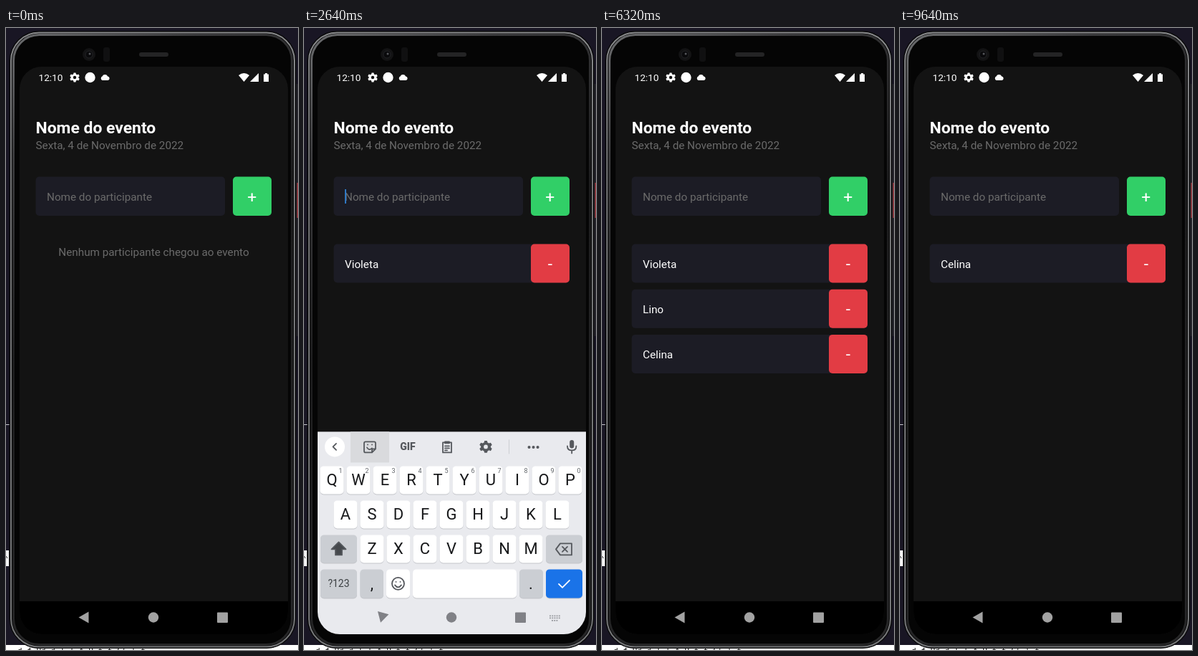
An HTML page that plays this animation: 408 by 868 pixels, repeating every 9.68 s.

```html
<!DOCTYPE html>
<html lang="pt-BR">
<head>
<meta charset="utf-8">
<title>Lista de participantes</title>
<style>
html, body { margin: 0; width: 100%; height: 100%; overflow: hidden; background: #191624; }
svg { display: block; font-family: Roboto, sans-serif; }
.body { font-size: 15.25px; }
.mid { text-anchor: middle; }
.muted { fill: #6b6b6b; }
.field { fill: #1c1c25; }
.line { fill: none; stroke: #55585d; stroke-width: 1.8; stroke-linecap: round; stroke-linejoin: round; }
.key { font-size: 22px; fill: #17181a; }
.hint { font-size: 9px; fill: #5f6368; }
.sign { font-size: 22.9px; fill: #fff; }
</style>
</head>
<body>
<svg width="408" height="868" viewBox="0 0 408 868">
  <defs>
    <clipPath id="screenClip"><rect x="19" y="54" width="375" height="792" rx="31"/></clipPath>
    <linearGradient id="rim" x2="0" y2="1">
      <stop offset="0" stop-color="#8a8b8d"/>
      <stop offset=".2" stop-color="#737476"/>
      <stop offset="1" stop-color="#77787a"/>
    </linearGradient>
    <linearGradient id="bevel" x2=".3" y2="1">
      <stop offset="0" stop-color="#6b6c6e"/>
      <stop offset=".18" stop-color="#3a3a3c"/>
      <stop offset=".5" stop-color="#1b1b1c"/>
      <stop offset="1" stop-color="#262627"/>
    </linearGradient>
    <path id="gear" d="M-1.4-6.5h2.8l.5 1.9 1.5.8 1.9-.6 1.4 2.4-1.4 1.4v1.2l1.4 1.4-1.4 2.4-1.9-.6-1.5.8-.5 1.9h-2.8l-.5-1.9-1.5-.8-1.9.6-1.4-2.4 1.4-1.4v-1.2l-1.4-1.4 1.4-2.4 1.9.6 1.5-.8zM0-2.2a2.2 2.2 0 1 0 0 4.4 2.2 2.2 0 1 0 0-4.4z" fill-rule="evenodd"/>
  </defs>

  <!-- Desktop behind the phone -->
  <rect width="408" height="868" fill="#191624"/>
  <rect x="405" y="78" width="3" height="352" fill="#25242b"/>
  <rect x="406.500" y="216" width="1.500" height="49" fill="#a03c42"/>
  <path d="M0 553.500h5" stroke="#c9c9cf"/>
  <rect y="729" width="4" height="22" fill="#f4f4f4"/>
  <path d="M0 737l2 3" stroke="#333"/>
  <rect y="861" width="408" height="7" fill="#fff"/>

  <!-- Phone shell -->
  <rect x="5" y="4.500" width="400" height="861" rx="41" fill="#050505" stroke="#0b0b0c"/>
  <rect x="7" y="6.500" width="396" height="857" rx="39" fill="#050505" stroke="url(#rim)" stroke-width="2"/>
  <rect x="10.500" y="9.500" width="389" height="851" rx="36" fill="#050505" stroke="url(#bevel)" stroke-width="3"/>
  <rect x="13" y="12" width="384" height="846" rx="34" fill="#050505"/>
  <circle cx="116" cy="37" r="9" fill="#131314"/>
  <circle cx="116" cy="37" r="5" fill="#09090b" stroke="#222326"/>
  <circle cx="117" cy="36" r="1.5" fill="#55575b"/>
  <rect x="136" y="27" width="9" height="20" rx="3" fill="#101011"/>
  <rect x="186" y="34" width="41" height="6" rx="3" fill="#242425"/>
  <text x="16" y="873" font-family="DejaVu Sans Mono, monospace" font-size="11" fill="#111">d f Ud  d  T  T   A    U t  t   Cl  l t</text>

  <g clip-path="url(#screenClip)">
    <rect x="19" y="54" width="375" height="792" fill="#131313"/>

    <g fill="#fff">
      <text x="45.500" y="74" font-size="13.6">12:10</text>
      <use href="#gear" x="96" y="69"/>
      <circle cx="117.500" cy="69" r="7.2"/>
      <path d="M134.500 73a3 3 0 0 1 0-5.500a4.200 4.200 0 0 1 7.600 0a2.800 2.800 0 0 1 .4 5.500z"/>
      <path d="M325 66q7.500-6 15 0l-7.500 9z"/>
      <path d="M353 63v12h-12z"/>
      <path d="M360 64.500h2v-1.500h3v1.500h2v10.500h-7z"/>
    </g>

    <text x="41.500" y="147" font-size="22.9" font-weight="700" fill="#fff">Nome do evento</text>
    <text x="41.500" y="169" class="body muted">Sexta, 4 de Novembro de 2022</text>

    <rect x="41.500" y="207.500" width="264.500" height="54.500" rx="5" class="field"/>
    <text id="placeholder" x="57" y="241" class="body muted">Nome do participante</text>
    <text id="typed" x="57" y="241" class="body" fill="#fff"></text>
    <path id="underline" stroke="#ddd"/>
    <rect id="caret" y="225" width="2" height="20" fill="#2f78c4"/>
    <g id="plus">
      <rect x="317" y="207.500" width="54" height="54.500" rx="5" fill="#31cf67"/>
      <text x="343.800" y="244" class="sign mid">+</text>
    </g>
    <text id="empty" x="206.500" y="318" class="body mid muted">Nenhum participante chegou ao evento</text>
    <g id="rows"></g>

    <rect x="19" y="800" width="375" height="46" fill="#000"/>

    <g id="keyboard">
      <rect x="19" y="562" width="375" height="290" fill="#e9eaee"/>
      <rect id="highlight" x="65" y="562" width="54" height="43" fill="#d9dadd"/>
      <circle cx="43" cy="583" r="14" fill="#fff"/>
      <path id="chevron" class="line"/>
      <g id="suggestions" class="mid" font-size="16" fill="#55585d">
        <text id="suggestion" x="102" y="589"></text>
        <text x="205" y="589">C</text>
        <text x="307" y="589">B</text>
        <path d="M151 572v23M259.500 572v23" stroke="#cccfd3"/>
      </g>
      <g id="tools">
        <path class="line" d="M86 576h12q2 0 2 2v8l-5 5h-9q-2 0-2-2v-11q0-2 2-2zM100 586h-3q-2 0-2 2v3M88 584q3 5 7 1M89 580h.1M95 580h.1"/>
        <text x="145" y="588" class="mid" font-size="14" font-weight="900" fill="#55585d">GIF</text>
        <path class="line" d="M194 577h12v14h-12zM197 576h6v2h-6zM197 582h6M197 585h6M197 588h3"/>
        <use href="#gear" transform="translate(254 583) scale(1.3)" fill="#55585d"/>
        <path d="M286.500 573v20" stroke="#cccfd3"/>
        <path d="M314.500 583.500h.1M320.500 583.500h.1M326.500 583.500h.1" class="line" style="stroke-width:4"/>
      </g>
      <rect x="371.200" y="573.500" width="6" height="11.500" rx="3" fill="#55585d"/>
      <path class="line" d="M368 582q0 6 6.200 6t6.200-6M374.200 588v4"/>
      <g id="keys"></g>
      <path id="shift" class="line" d="M48.500 716l10 10h-5.500v8h-9v-8h-5.500z"/>
      <path class="line" d="M358 718h16v16h-16l-6-8zM361 722.500l7 7M368 722.500l-7 7"/>
      <g class="line">
        <circle cx="131.500" cy="774" r="8.500"/>
        <path d="M127 776q4.500 6 9 0M128.500 771.500h.1M134.500 771.500h.1"/>
      </g>
      <path d="M356 774.500l5 5 10-10" class="line" style="stroke:#fff"/>
      <path d="M343 819h15M343 822h15M346 825.500h9" stroke="#999ba0" stroke-width="1.800" stroke-dasharray="2 1.200"/>
    </g>

    <g id="nav">
      <path id="back" d="M-8-6.500h16l-8 14z"/>
      <circle cx="206" cy="822.500" r="7.200"/>
      <rect x="295" y="815.500" width="15" height="14.500" rx="1"/>
    </g>
  </g>
</svg>
<script>
const LOOP = 9680, OPEN_TIME = 170, CLOSE_TIME = 120;
const sessions = [
  { name: 'Violeta', open: 200, type: 1160, step: 60, close: 1540, add: 1960, press: 1880 },
  { name: 'Lino', open: 2500, type: 2840, step: 140, close: 3400, add: 3880, press: 3800 },
  { name: 'Celina', open: 4300, type: 4700, step: 120, close: 5520, add: 5960, press: 5880 }
];
const removals = {
  Lino: { press: 6800, at: 7480 },
  Violeta: { press: 8400, at: 9200 }
};

const $ = id => document.getElementById(id);
const clamp = v => Math.max(0, Math.min(1, v));
const show = (el, on) => el.setAttribute('visibility', on ? 'inherit' : 'hidden');
const set = (id, attr, value) => $(id).setAttribute(attr, value);

function add(parent, tag, attrs, text = '') {
  const el = document.createElementNS('http://www.w3.org/2000/svg', tag);
  for (const name in attrs) el.setAttribute(name, attrs[name]);
  el.textContent = text;
  return parent.appendChild(el);
}

function key(x, y, width, fill = '#fff', height = 39) {
  const box = { x, width, height, rx: 5 };
  add($('keys'), 'rect', { ...box, y: y + 1, fill: '#c3c5ca' });
  add($('keys'), 'rect', { ...box, y, fill });
}

const letters = [];
[['qwertyuiop', 39, 610], ['asdfghjkl', 58, 658], ['zxcvbnm', 95, 706]].forEach(([row, x0, y], r) => {
  [...row].forEach((letter, i) => {
    const x = x0 + i * 37;
    key(x - 16.5, y, 33);
    letters.push([letter, add($('keys'), 'text', { x, y: y + 27, class: 'key mid' })]);
    if (r === 0) add($('keys'), 'text', { x: x + 12, y: y + 10, class: 'hint mid' }, (i + 1) % 10);
  });
});
const GRAY = '#cbced3';
[[23, 706, 51, GRAY], [338, 706, 51, GRAY], [23, 754, 51, GRAY, 40], [78.5, 754, 32.5, GRAY, 40],
 [115, 754, 33, '#fff', 40], [152, 754, 145, '#fff', 40], [301, 754, 33, GRAY, 40],
 [338, 754, 51, '#1a73e8', 40]].forEach(k => key(...k));
add($('keys'), 'text', { x: 48.5, y: 779, class: 'mid', 'font-size': 14, fill: '#3c4043' }, '?123');
add($('keys'), 'text', { x: 95, y: 782, class: 'key mid' }, ',');
add($('keys'), 'text', { x: 317, y: 782, class: 'key mid' }, '.');

const rows = sessions.map((_, i) => {
  const g = add($('rows'), 'g', { transform: `translate(0 ${301.5 + i * 63.2})` });
  add(g, 'rect', { x: 41.5, width: 329.5, height: 54, rx: 5, class: 'field' });
  const label = add(g, 'text', { x: 57, y: 33, class: 'body', fill: '#fff' });
  const button = add(g, 'g', {});
  add(button, 'rect', { x: 317, width: 54, height: 54, rx: 5, fill: '#e23c44' });
  add(button, 'text', { x: 344, y: 35.5, class: 'sign mid' }, '-');
  return { g, label, button };
});

// Touch feedback: dips to 20 % opacity, holds briefly, then recovers.
function touch(t, press) {
  const dt = t - press;
  if (dt < 0) return 1;
  return dt < 100 ? 1 - 0.8 * clamp(dt / 60) : 0.2 + 0.8 * clamp((dt - 100) / 160);
}

function render(t) {
  const session = sessions.findLast(s => t >= s.open);
  let text = '', progress = 0, focused = false;
  if (session) {
    const count = Math.floor((t - session.type) / session.step) + 1;
    if (t < session.add) text = session.name.slice(0, Math.max(0, count));
    focused = t < session.close;
    progress = focused ? clamp((t - session.open) / OPEN_TIME) : 1 - clamp((t - session.close) / CLOSE_TIME);
  }

  $('typed').textContent = text;
  show($('placeholder'), !text);
  const width = text ? $('typed').getComputedTextLength() : 0;
  set('caret', 'x', 57 + width);
  show($('caret'), focused);
  set('underline', 'd', `M57 242.500h${width}`);
  show($('underline'), focused && text);
  set('plus', 'opacity', Math.min(...sessions.map(s => touch(t, s.press))));

  const lift = 1 - (1 - progress) ** 3;
  set('keyboard', 'transform', `translate(0 ${284 * (1 - lift)})`);
  show($('keyboard'), progress > 0);
  show($('suggestions'), text);
  show($('tools'), !text);
  show($('highlight'), !text && session && t - session.open < 200);
  $('suggestion').textContent = text;
  set('chevron', 'd', text ? 'M41 578.500l4.500 4.500-4.500 4.500' : 'M45 578.500l-4.500 4.500 4.500 4.500');
  $('shift').style.fill = text ? 'none' : '#45484c';
  for (const [letter, el] of letters) el.textContent = text ? letter : letter.toUpperCase();
  set('nav', 'fill', progress > 0.5 ? '#808186' : '#a2a2a2');
  set('back', 'transform', `translate(109 822.500) rotate(${90 * (1 - progress)})`);

  const list = sessions.map(s => s.name).filter((name, i) =>
    t >= sessions[i].add && !(t >= removals[name]?.at));
  show($('empty'), !list.length);
  rows.forEach(({ g, label, button }, i) => {
    const name = list[i];
    show(g, name);
    label.textContent = name || '';
    button.setAttribute('opacity', removals[name] ? touch(t, removals[name].press) : 1);
  });
}

const start = performance.now();
function tick() {
  render((performance.now() - start) % LOOP);
  requestAnimationFrame(tick);
}
tick();
</script>
</body>
</html>
```
